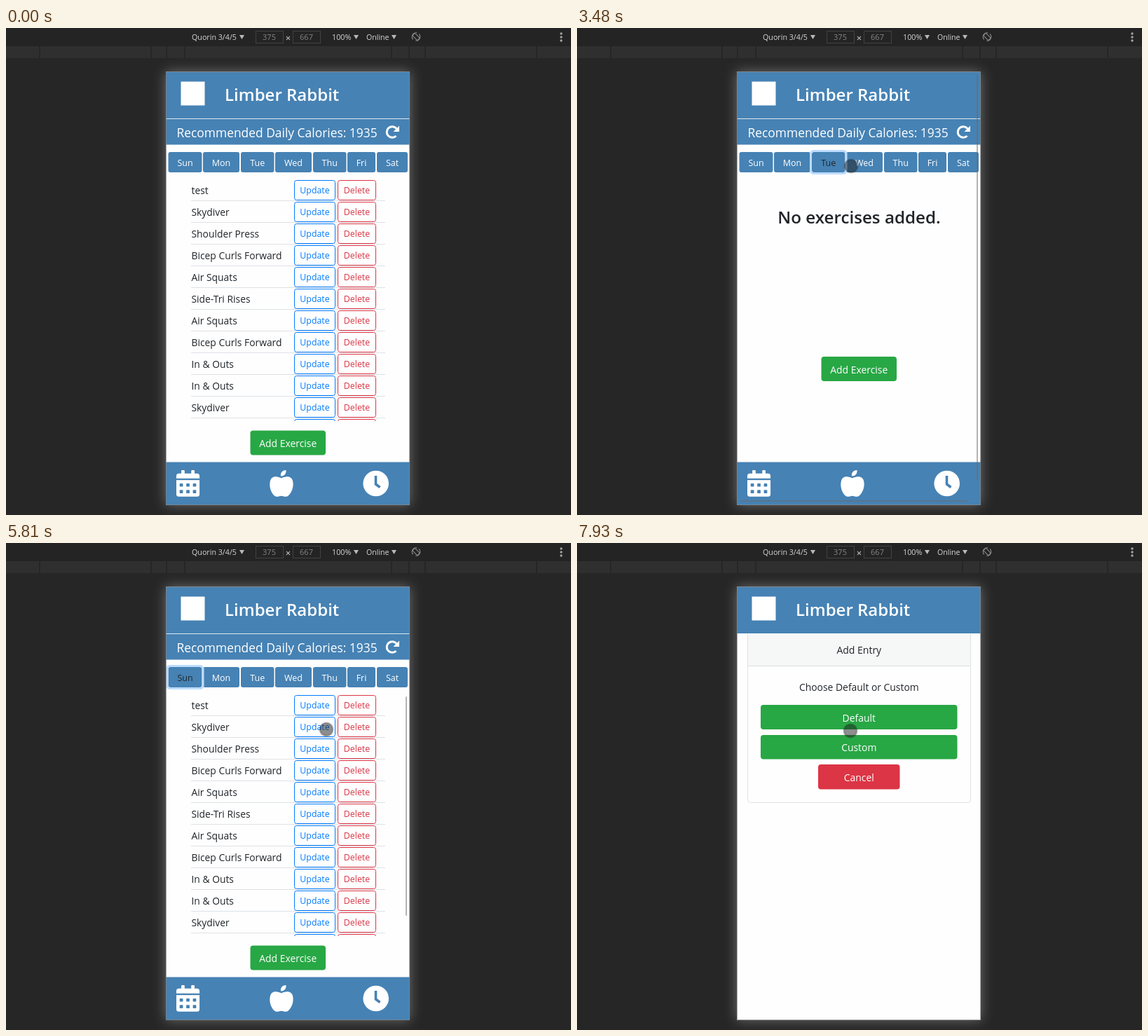
Recreate the animation shown at these times as an HTML page. Size 806 by 695 pixels, loop 8 s.

```html
<!DOCTYPE html>
<html lang="en">
<head>
<meta charset="utf-8">
<title>Exercise planner</title>
<style>
  html, body { margin: 0; width: 100%; height: 100%; overflow: hidden; background: #262626; }
  svg { display: block; width: 806px; height: 695px; font-family: "Open Sans", "Noto Sans", sans-serif; }
</style>
</head>
<body>
<svg id="stage" viewBox="0 0 806 695"></svg>
<script>
const LOOP = 8000;
const BLUE = '#4682b4', GREEN = '#28a745', RED = '#dc3545', LINK = '#007bff', INK = '#212529', PAPER = '#fefefe';

const rect = (x, y, w, h, fill, extra = '') =>
  `<rect x="${x}" y="${y}" width="${w}" height="${h}" fill="${fill}" ${extra}/>`;
const text = (x, y, size, fill, label, extra = '') =>
  `<text x="${x}" y="${y}" font-size="${size}" fill="${fill}" ${extra}>${label}</text>`;
const MID = 'text-anchor="middle"';
const group = (id, body, extra = '') => `<g id="${id}" ${extra}>${body}</g>`;

const button = (x, y, w, h, fill, label) =>
  rect(x, y, w, h, fill, 'rx="4"') + text(x + w / 2, y + h / 2 + 6, 13.9, '#fff', label, MID);
const outlineButton = (x, y, w, color, label) =>
  rect(x + .5, y + .5, w - 1, 28, PAPER, `rx="3" stroke="${color}"`) +
  text(x + w / 2, y + 19, 12.35, color, label, MID);

// Browser device toolbar
function toolbar() {
  const light = '#d6d6d6', dim = '#858585';
  const caret = x => `<path d="M${x} 10h7l-3.5 6z" fill="#b9b9b9"/>`;
  const field = (x, w, n) => rect(x + .5, 4.5, w, 17, '#242424', 'stroke="#424242"') + text(x + w / 2, 17, 11, dim, n, MID);
  const ticks = [48, 207, 229, 255, 550, 575, 598, 757].map(x => rect(x - .5, 26, 1, 17, '#1f1f1f')).join('');
  const dots = [8, 13, 18].map(y => `<circle cx="792" cy="${y}" r="1.7" fill="#a5a5a5"/>`).join('');
  return rect(0, 0, 806, 26, '#242424') + rect(0, 26, 806, 17, '#2f2f2f') + ticks +
    text(265, 17, 10.7, light, 'Quorin 3/4/5') + caret(333) +
    field(356, 39, 375) + text(402.5, 19, 13, light, '×', MID) + field(409, 39, 667) +
    text(465, 17, 10.8, light, '100%') + caret(496) + text(514, 17, 10.6, light, 'Online') + caret(550) +
    `<g fill="none" stroke="#8a8a8a" stroke-width="1.1" transform="rotate(-45 585 12.500)">
      <rect x="582.5" y="7.5" width="5" height="10" rx="1"/>
      <circle cx="585" cy="12.5" r="5.8" stroke-dasharray="14 4.2"/></g>` + dots;
}

function calendarIcon() {
  const holes = [64, 192, 320].flatMap(x => [256, 384].map(y => rect(x, y, 64, 64, BLUE, 'rx="12"'))).join('');
  return `<g transform="translate(243 631) scale(.0738)">` +
    rect(96, 0, 64, 100, '#fff', 'rx="12"') + rect(288, 0, 64, 100, '#fff', 'rx="12"') +
    rect(0, 64, 448, 448, '#fff', 'rx="48"') + rect(0, 160, 448, 32, BLUE) + holes + '</g>';
}

const footer = () => rect(228, 619.5, 348, 61.5, BLUE) + calendarIcon() +
  `<g fill="#fff">
    <path d="M392.800 642.500C387 639.500 379.500 638.500 377 646C374.500 655 379 665 383.500 668C387.500 670 390 667.800 392.800 667.800C395.600 667.800 398 670 402 668C406.500 665 411.500 655 409 646C406.500 638.500 398.500 639.500 392.800 642.500Z"/>
    <path d="M392 639.500C391 634 395 631 399.500 631C400 636 397 640 392 639.500Z"/>
    <circle cx="527.7" cy="650" r="18.3"/></g>
  <path d="M527.500 639V651L533.500 655.500" fill="none" stroke="${BLUE}" stroke-width="3.6"/>`;

const summary = () => rect(228, 129, 348, 1, '#dce8f1') + rect(228, 130, 348, 36.5, BLUE) +
  text(243.5, 156, 17.4, '#fff', 'Recommended Daily Calories: 1935') +
  `<path d="M557 143.500A7.800 7.800 0 1 0 556.500 154" fill="none" stroke="#fff" stroke-width="3"/>
   <path d="M561 139.500V148H552.500Z" fill="#fff"/>`;

const DAYS = [['Sun', 231.5, 48], ['Mon', 281, 52], ['Tue', 335, 47.5], ['Wed', 384, 52],
  ['Thu', 438, 47.5], ['Fri', 487, 40], ['Sat', 529, 44]];
const dayTabs = () => DAYS.map(([name, x, w]) => rect(x, 177, w, 29, BLUE, 'rx="3"') +
  text(x + w / 2, 196.7, 12.5, '#fff', name, `${MID} id="${name}"`)).join('') +
  rect(0, 175.5, 0, 32, 'none', 'id="ring" rx="4" stroke="#bcdcff" stroke-width="3"');

const exerciseRows = (names, x) => names.map((name, i) => {
  const y = Math.floor(217 + i * 31.05);
  return text(264.5, y + 20, 13.85, INK, name) + rect(264, y + 29, 277, 1, '#dee2e6') +
    outlineButton(x, y, 59, LINK, 'Update') + outlineButton(x + 62, y, 55, RED, 'Delete');
}).join('');

const addButton = y => button(348.5, y, 107.5, 35, GREEN, 'Add Exercise');

const SUNDAY = ['test', 'Skydiver', 'Shoulder Press', 'Bicep Curls Forward', 'Air Squats', 'Side-Tri Rises',
  'Air Squats', 'Bicep Curls Forward', 'In &amp; Outs', 'In &amp; Outs', 'Skydiver', ''];
const MONDAY = ['new mon exercise', 'newest mon exercise'];

const entryCard = () =>
  `<path d="M243.500 130V366.500a4 4 0 0 0 4 4H557.500a4 4 0 0 0 4-4V130" fill="${PAPER}" stroke="#dfe1e1"/>` +
  rect(244, 129.5, 317, 45.5, '#f6f7f7') + rect(244, 175, 317, 1, '#dcdfdf') +
  text(402.3, 158, 14, INK, 'Add Entry', MID) + text(402.3, 211, 13.9, INK, 'Choose Default or Custom', MID) +
  button(262, 231, 280.5, 35, GREEN, 'Default') + button(262, 274, 280.5, 34.5, GREEN, 'Custom') +
  button(344, 316, 116.5, 35.5, RED, 'Cancel');

const BAR = '#6a6a6a';
document.getElementById('stage').innerHTML = `
  <defs>
    <filter id="soft" x="-20%" y="-20%" width="140%" height="140%"><feGaussianBlur stdDeviation="9"/></filter>
    <clipPath id="listArea">${rect(229, 210, 347, 351, '#000')}</clipPath>
    <radialGradient id="touchFill">
      <stop offset="0" stop-color="#1e1e1e" stop-opacity=".5"/>
      <stop offset=".6" stop-color="#1e1e1e" stop-opacity=".5"/>
      <stop offset=".8" stop-color="#1e1e1e" stop-opacity=".56"/>
      <stop offset="1" stop-color="#1e1e1e" stop-opacity="0"/>
    </radialGradient>
  </defs>` +
  rect(0, 0, 806, 695, '#262626') + rect(228, 62.5, 348, 618, '#707070', 'filter="url(#soft)"') + toolbar() +
  rect(228, 62.5, 348, 618.5, PAPER) + rect(228, 62.5, 348, 66.5, BLUE) +
  rect(249.5, 76.5, 34, 34, '#fff') + text(312, 104, 24, '#fff', 'Limber Rabbit', 'font-weight="600"') +
  group('planner', summary() + dayTabs() + footer() +
    group('sunday', group('rows', exerciseRows(SUNDAY, 411), 'clip-path="url(#listArea)"') + addButton(574.5)) +
    group('monday', exerciseRows(MONDAY, 414) + addButton(322.5)) +
    group('empty', text(402.5, 278.5, 24.2, INK, 'No exercises added.', `${MID} font-weight="600"`) + addButton(469))) +
  group('entry', entryCard()) +
  rect(228.5, 62.5, 347, 618, 'none', 'stroke="#858585" stroke-opacity=".7"') +
  group('pageBars', rect(570, 67, 2, 579, BAR, 'rx="1"') + rect(233, 674, 324, 2, BAR, 'rx="1"')) +
  group('listBar', rect(570, 219, 2, 313, BAR, 'rx="1"')) +
  group('touch', '<circle r="11" fill="url(#touchFill)"/>') +
  group('arrow', '<path d="M.5 .5V17L4.300 13.300L7 19.200L9.300 18.200L6.800 12.500H12Z" fill="#fff" stroke="#000" stroke-width=".9"/>');

// Bursts of screen updates: start, end, number of steps
const BURSTS = [[70, 300, 4], [470, 1070, 9], [2450, 2550, 2], [2790, 2870, 2], [3100, 3880, 11],
  [3960, 4440, 7], [5050, 5810, 11], [5900, 6390, 7], [6540, 7090, 8], [7240, 7930, 10]];

// Pointer path: time, x, y
const PATH = [[70, 755, 628], [300, 742, 432], [470, 726, 428], [1070, 337, 338], [2450, 302, 196],
  [2550, 347, 197], [2870, 354, 200], [3256, 358, 198], [3412, 391, 197], [3880, 406, 198], [4400, 408, 198],
  [5050, 372, 203], [5280, 258, 197], [5430, 256, 197], [5810, 457, 266], [5900, 461, 262], [6390, 456, 236],
  [6540, 456, 235], [6854, 403, 566], [7090, 397, 600], [7400, 398, 599], [7930, 390, 268]];

const $ = id => document.getElementById(id);
const show = (id, on) => $(id).style.display = on ? '' : 'none';

function snap(t) {
  let shown = 0;
  for (const [start, end, n] of BURSTS) {
    if (t < start) break;
    const step = (end - start) / (n - 1);
    shown = start + Math.min(n - 1, Math.floor((t - start) / step)) * step;
  }
  return shown;
}

function pointerAt(t) {
  const i = PATH.findIndex(p => p[0] >= t);
  if (i <= 0) return PATH[0].slice(1);
  const [t0, x0, y0] = PATH[i - 1], [t1, x1, y1] = PATH[i];
  const k = (t - t0) / (t1 - t0);
  return [x0 + (x1 - x0) * k, y0 + (y1 - y0) * k];
}

// Overlay scrollbars stay for half a second, then fade
const flash = (t, start) => t < start ? 0 : .5 * Math.max(0, Math.min(1, (start + 800 - t) / 300));

function render(now) {
  const t = snap(now % LOOP);
  const inEntry = t >= 7380;
  const view = t < 2450 || t >= 5400 ? 'sunday' : t < 3250 ? 'monday' : 'empty';
  const focus = t < 2450 ? '' : t < 3175 ? 'Mon' : t < 4030 ? 'Tue' : t < 5350 ? 'Wed' : 'Sun';
  const halfway = t < 2550;

  show('planner', !inEntry);
  show('entry', inEntry);
  for (const id of ['sunday', 'monday', 'empty']) show(id, id === view);

  for (const [name, x, w] of DAYS) {
    const on = name === focus;
    $(name).setAttribute('fill', on ? (halfway ? '#8199ae' : INK) : '#fff');
    if (on) {
      $('ring').setAttribute('x', x - 1.5);
      $('ring').setAttribute('width', w + 3);
    }
  }
  show('ring', focus && !halfway);
  $('pageBars').setAttribute('opacity', flash(t, 3250));
  $('listBar').setAttribute('opacity', flash(t, 5400));

  const [x, y] = pointerAt(t);
  const visible = t >= 70 && !(t >= 4400 && t < 5050);
  const inside = x < 576;
  show('touch', visible && inside);
  show('arrow', visible && !inside);
  $(inside ? 'touch' : 'arrow').setAttribute('transform', `translate(${x} ${y})`);
}

const begin = performance.now();
function tick() {
  render(performance.now() - begin);
  requestAnimationFrame(tick);
}
tick();
</script>
</body>
</html>
```
